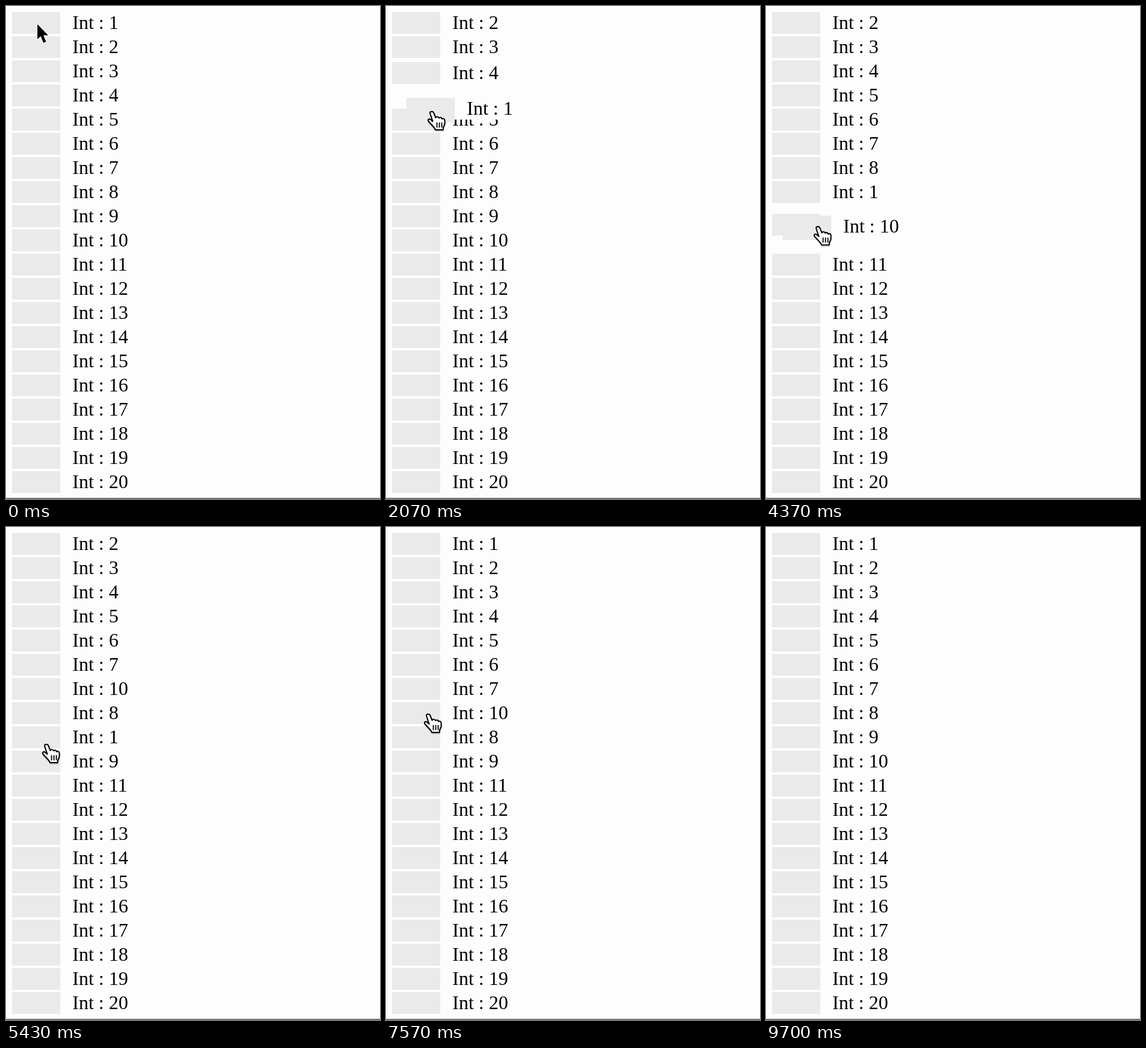
An HTML page that plays this animation: 620 by 816 pixels, repeating every 9730 ms.

```html
<!DOCTYPE html>
<html lang="en">
<head>
<meta charset="utf-8">
<title>Sortable list</title>
<style>
  html, body { margin: 0; width: 100%; height: 100%; overflow: hidden; background: #fdfdfd; }
  svg { display: block; }
  text { font: 32px "Liberation Serif", "Times New Roman", serif; fill: #000; }
</style>
</head>
<body>
<svg width="620" height="816" viewBox="0 0 620 816">
  <rect width="620" height="816" fill="#fdfdfd"/>
  <rect y="814" width="620" height="2" fill="#777"/>
  <g id="list"></g>
  <path id="arrow" d="M0 0V25L5.5 20L10 31L14.5 29L10 18.5H18Z" fill="#000" stroke="#fff" stroke-width="3" paint-order="stroke" stroke-linejoin="round"/>
  <g id="hand" stroke-linejoin="round" stroke-linecap="round">
    <use href="#fist" transform="translate(.5 2)" opacity=".2"/>
    <path id="fist" d="M-2.5 2.5C-3-.5 2-1.5 3.5 1.5L7 10C8 7.5 12 8 12.5 10.5C14 8.5 17 9.5 17.3 12C19 10.5 22 11.5 22 14.5V19C22 22 20 24 19.5 26L19 30H6.5C5.5 26 0 22-5 16C-7 13-4 11-1.5 13L2 16Z" fill="#fff" stroke="#000" stroke-width="2"/>
    <path d="M9 18.5v7m4-7v7m4-7v7" stroke="#000" stroke-width="1.8"/>
  </g>
</svg>
<script>
const LOOP = 9730, STEP = 10, TOP = 10, PITCH = 40, ROWS = 20, EASE = 47;
const HAND_FROM = 700, GONE = 8850;
const byId = id => document.getElementById(id);

// Pointer key points: time, x, y
const keys = [
  [0, 52, 30], [1150, 52, 33], [2070, 76, 175], [2500, 91, 255],
  [3050, 66, 318], [3570, 66, 323], [4150, 68, 388], [4500, 94, 345],
  [4980, 72, 270], [5430, 67, 360], [5500, 67, 353], [6030, 71, 95],
  [6550, 57, 29], [7570, 70, 310], [8300, 84, 393], [8650, 74, 401],
  [GONE, 360, 430]
];

const drags = [
  { item: 1, from: 1150, to: 3050, down: true },
  { item: 10, from: 4150, to: 4980, down: false },
  { item: 1, from: 5500, to: 6600, down: false },
  { item: 10, from: 7600, to: 8500, down: true }
];

const slope = (i, c) => (keys[i + 1][c] - keys[i][c]) / (keys[i + 1][0] - keys[i][0]);

// Harmonic mean of both slopes, so the curve never overshoots a key
function tangent(i, c) {
  if (i === 0 || i === keys.length - 1) return 0;
  const a = slope(i - 1, c), b = slope(i, c);
  return a * b <= 0 ? 0 : 2 * a * b / (a + b);
}

function pointer(t) {
  let i = 0;
  while (i < keys.length - 2 && keys[i + 1][0] <= t) i++;
  const h = keys[i + 1][0] - keys[i][0];
  const u = Math.min(1, (t - keys[i][0]) / h), v = 1 - u;
  const at = c => v * v * (1 + 2 * u) * keys[i][c] + u * u * (3 - 2 * u) * keys[i + 1][c]
    + h * u * v * (v * tangent(i, c) - u * tangent(i + 1, c));
  return [at(1), at(2)];
}

const slotY = slot => TOP + slot * PITCH;

// Run the list once; every state is then looked up by time
function simulate() {
  const states = [];
  const order = Array.from({ length: ROWS }, (_, i) => i);
  const ys = order.map(slotY);
  const rate = 1 - Math.exp(-STEP / EASE);
  for (let t = 0; t < LOOP; t += STEP) {
    const drag = drags.find(d => t >= d.from && t < d.to);
    let held = null;
    if (drag) {
      const item = drag.item - 1, slot = order.indexOf(item);
      const [x, y] = pointer(t), [gx, gy] = pointer(drag.from);
      drag.home ??= slotY(slot);
      held = { item, x: x - gx, y: drag.home + y - gy };
      const place = (held.y - TOP) / PITCH;
      const next = drag.down
        ? Math.max(slot, Math.floor(place))
        : Math.max(0, Math.min(slot, Math.ceil(place - 0.5)));
      order.splice(slot, 1);
      order.splice(next, 0, item);
      ys[item] = slotY(next);
    }
    order.forEach((item, slot) => { ys[item] += (slotY(slot) - ys[item]) * rate; });
    states.push({ ys: ys.slice(), held });
  }
  return states;
}

const list = byId("list"), arrow = byId("arrow"), hand = byId("hand");
list.innerHTML = Array.from({ length: ROWS }, (_, i) =>
  `<g><rect x="10" width="620" height="36" fill="#fdfdfd"/>
  <rect x="10" width="80" height="36" fill="#eaeaea"/>
  <text x="110" y="28">Int : ${i + 1}</text></g>`).join("");
const rows = [...list.children];
const states = simulate();

const move = (el, x, y) => el.setAttribute("transform", `translate(${x} ${y})`);
const show = (el, on) => el.setAttribute("visibility", on ? "visible" : "hidden");

function draw(time) {
  // The picture advances thirty times a second
  const tick = Math.floor((time % LOOP + 5) * 0.03);
  const t = Math.min(LOOP - STEP, Math.round(tick * 10 / 3) * STEP);
  const { ys, held } = states[t / STEP];

  rows.forEach((row, i) => {
    const lifted = held !== null && held.item === i;
    const [back, grip] = row.children;
    move(row, lifted ? Math.round(held.x) : 0, Math.round(lifted ? held.y : ys[i]));
    grip.setAttribute("height", lifted ? 40 : 36);
    show(back, lifted);
    if (lifted && list.lastChild !== row) list.append(row);
  });

  const [x, y] = pointer(t);
  const here = t < GONE, pointing = t >= HAND_FROM && x < 98;
  show(arrow, here && !pointing);
  show(hand, here && pointing);
  move(arrow, x, y);
  move(hand, x - 0.5, y);
}

function loop() {
  draw(performance.now());
  requestAnimationFrame(loop);
}
loop();
</script>
</body>
</html>
```
